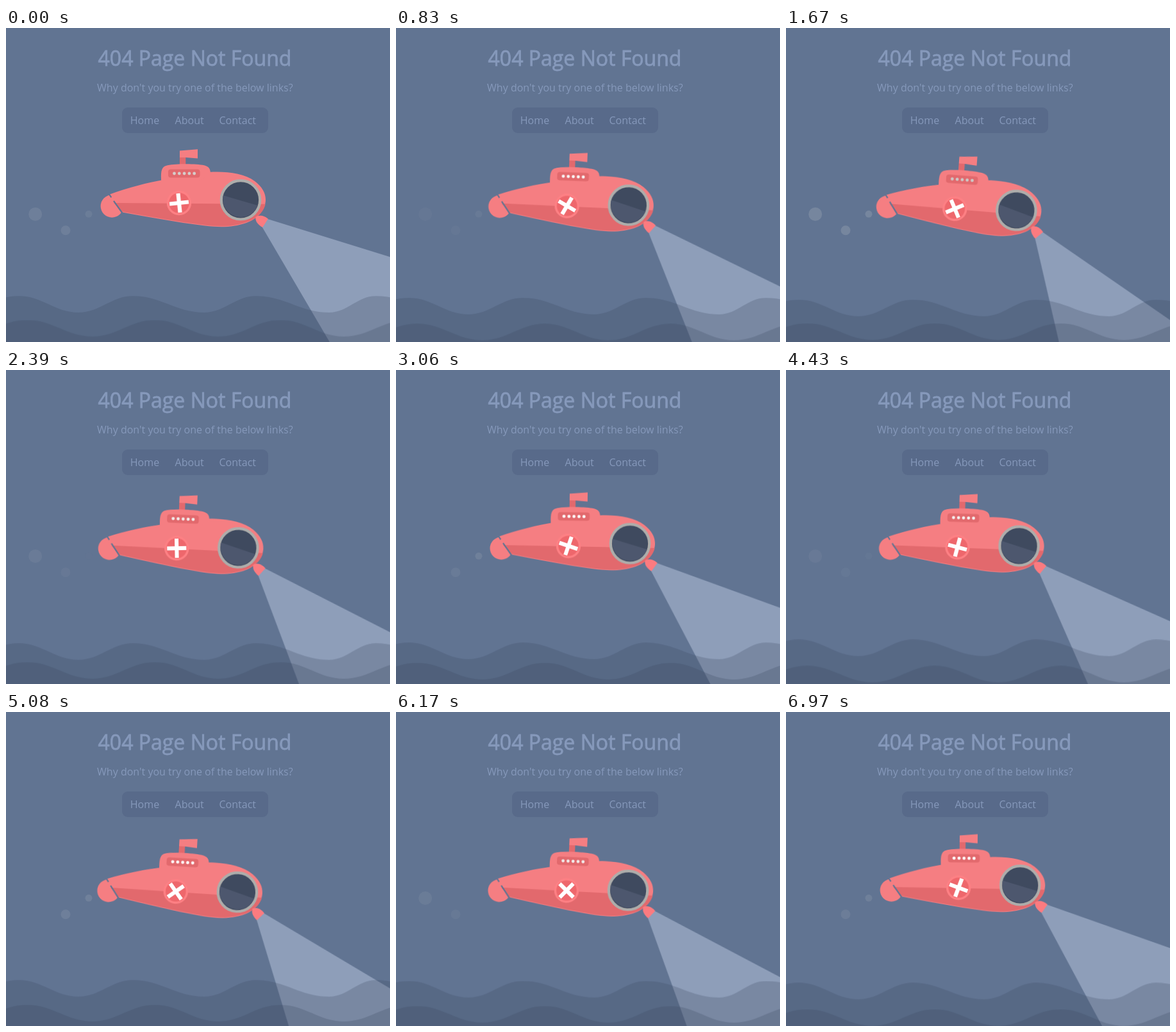
Animation of 599 by 490 pixels, one loop 7030 ms. Source, as an HTML page:

```html
<!DOCTYPE html>
<html lang="en">
<head>
<meta charset="utf-8">
<title>404 Page Not Found</title>
<style>
  html, body { margin: 0; width: 100%; height: 100%; overflow: hidden; background: #617492; }
  svg { display: block; width: 599px; height: 490px; }
  text { font: 16px "Open Sans", sans-serif; fill: #8699bb; }
  .title { font-size: 32px; stroke: #8699bb; stroke-width: .8px; }

  .light { fill: #f57e82; }
  .dark { fill: #e2696d; }
  .wave { fill: #3d4862; fill-opacity: .25; }
  .bubble { fill: #77879f; }

  .sub, .lamp, .wheel, .wave, .bubble, .dots { animation: 7.03s linear infinite; }
  .sub { transform-origin: 148px 189px; animation-name: pitch; }
  .lamp { transform-origin: 404.5px 304px; animation-name: sweep; }
  .wheel { transform-origin: 270px 273px; animation-name: spin; }
  .dots { animation-name: glow; }
  #back { animation-name: swell; }
  #front { animation-name: lap; }
  .big { animation-name: fade-big; }
  .mid { animation-name: fade-mid; }
  .small { animation-name: fade-small; }

  @keyframes pitch {
    0% { transform: rotate(0deg); }
    23.6% { transform: rotate(4.38deg); }
    50.6% { transform: rotate(-.62deg); }
    78% { transform: rotate(4.45deg); }
    100% { transform: rotate(.4deg); }
  }
  @keyframes sweep {
    0% { transform: rotate(0deg); }
    23.6% { transform: rotate(13.14deg); }
    50.6% { transform: rotate(-1.86deg); }
    78% { transform: rotate(13.35deg); }
    100% { transform: rotate(1.2deg); }
  }
  @keyframes spin {
    0% { transform: rotate(-6deg); }
    23.75% { transform: rotate(63deg); }
    43.5% { transform: rotate(108deg); }
    53.9% { transform: rotate(155deg); }
    72.3% { transform: rotate(232deg); }
    87.8% { transform: rotate(312deg); }
    100% { transform: rotate(385deg); }
  }
  @keyframes swell {
    0% { transform: translateY(1px); }
    36.6% { transform: translateY(10px); }
    77.2% { transform: translateY(0); }
    100% { transform: translateY(5.6px); }
  }
  @keyframes lap {
    0% { transform: translateY(1.5px); }
    17.2%, 57.9%, 98.6% { transform: translateY(10px); }
    37.6%, 78.2% { transform: translateY(0); }
    100% { transform: translateY(9.4px); }
  }
  @keyframes glow {
    0%, 27%, 54%, 81.4% { fill: #d6cdca; }
    6.4%, 33.4%, 60.4%, 87.8% { fill: #f1eae9; }
    16.4%, 23.5%, 43.5%, 50.5%, 70.5%, 77.9%, 98% { fill: #fff; }
    23.6%, 50.6%, 78% { fill: #cdc8c6; }
    100% { fill: #fff; }
  }
  @keyframes fade-big {
    0%, 27%, 54%, 81.4% { opacity: .6; }
    6.4%, 33.4%, 60.4%, 87.8% { opacity: .45; }
    16.4%, 23.5%, 43.5%, 50.5%, 70.5%, 77.9%, 98%, 100% { opacity: 0; }
    23.6%, 50.6%, 78% { opacity: 1; }
  }
  @keyframes fade-mid {
    0%, 27%, 54%, 81.4% { opacity: .6; }
    6.4%, 33.4%, 60.4%, 87.8% { opacity: .3; }
    11%, 38%, 65%, 92.4% { opacity: .15; }
    16.4%, 43.5%, 70.5%, 98% { opacity: .38; }
    18.2%, 45.3%, 72.3%, 100% { opacity: .6; }
    23.6%, 50.6%, 78% { opacity: 1; }
  }
  @keyframes fade-small {
    0%, 27%, 54%, 81.4% { opacity: .5; }
    6.4%, 33.4%, 60.4%, 87.8% { opacity: 0; }
    16.4%, 43.5%, 70.5%, 98%, 100% { opacity: .65; }
    23.6%, 50.6%, 78% { opacity: 1; }
  }
</style>
</head>
<body>
<svg viewBox="0 0 599 490">
  <rect width="599" height="490" fill="#617492"/>

  <text class="title" x="294.5" y="59" text-anchor="middle">404 Page Not Found</text>
  <text x="294.8" y="99" text-anchor="middle">Why don't you try one of the below links?</text>
  <rect x="181" y="124" width="228" height="40" rx="9" fill="#586a8a"/>
  <text x="193.8" y="150">Home</text>
  <text x="263.6" y="150">About</text>
  <text x="332.5" y="150">Contact</text>

  <circle class="bubble big" cx="45.7" cy="290.5" r="10.5"/>
  <circle class="bubble mid" cx="93" cy="315.8" r="7.5"/>
  <circle class="bubble small" cx="129" cy="290.3" r="5.5"/>

  <g class="sub">
    <!-- tail and hull -->
    <circle class="light" cx="165.3" cy="278" r="17.7"/>
    <path class="light" d="M162 259.5C190 249 220 241.5 250 236L319 224.7C345 223.5 372 227 388 239C400 248 405 258 405 268C405 281 395 297 375 304C355 311 335 311.5 310 308.5C265 303 220 294.5 181 287.5Z"/>
    <path class="dark" d="M168 273L404.6 274.7C403 284 394 297 375 303C355 310 335 310.5 310 307.5C265 302 220 293.5 181 286.5Z"/>
    <path d="M160 258L164.3 264.3M168 269.8L182 289.5" stroke="#617492" stroke-width="2.2"/>

    <!-- tower and periscope -->
    <path class="dark" d="M271 200H280.3V215H271Z"/>
    <path class="light" d="M271 191.6L299 189.3V203.6L280 202H271Z"/>
    <path class="light" d="M242.3 240C241 223 242.500 216 252 214.200C268 211.500 297 211.800 309 214.300C316 216 319 219.500 319 228L300 240Z"/>
    <rect class="dark" x="253" y="220.500" width="49.500" height="13" rx="4"/>
    <g class="dots">
      <circle cx="262.500" cy="227" r="2.400"/>
      <circle cx="270.300" cy="227" r="2.400"/>
      <circle cx="278.100" cy="227" r="2.400"/>
      <circle cx="285.900" cy="227" r="2.400"/>
      <circle cx="293.700" cy="227" r="2.400"/>
    </g>

    <!-- hatch -->
    <circle cx="270" cy="273" r="17.500" fill="#ee676c" stroke="#fd8084" stroke-width="3.400"/>
    <path class="wheel" d="M255 273H285M270 258V288" stroke="#fff" stroke-width="6.200"/>

    <!-- window -->
    <circle cx="366" cy="268.300" r="30.200" fill="#3f4a5f" stroke="#adadab" stroke-width="4.200"/>
    <path d="M338.900 261.200L392.700 276.900A28.100 28.100 0 0 1 338.900 261.200Z" fill="#4d576e"/>

    <g class="lamp">
      <path d="M408 297.900L1057 499.500L743 896L399 309.500Z" fill="#8e9eb9"/>
      <path d="M408.800 297.700L400.300 311C392.500 307 388.500 300.500 389.500 295.300C394 291.300 402 292.300 408.800 297.700Z" fill="#fb7b80"/>
    </g>
  </g>

  <path class="wave" id="back"/>
  <path class="wave" id="front"/>
</svg>
<script>
  // Smooth curve through alternating crests and troughs, closed below the stage.
  function wave(id, xs, crest, trough) {
    let d = '';
    xs.forEach((x, i) => {
      const y = i % 2 ? crest : trough, prev = i % 2 ? trough : crest;
      if (!i) { d = `M${x} ${y}`; return; }
      const bend = (x - xs[i - 1]) * .4;
      d += `C${xs[i - 1] + bend} ${prev} ${x - bend} ${y} ${x} ${y}`;
    });
    document.getElementById(id).setAttribute('d', d + 'V520H-100Z');
  }
  wave('back', [-80, 20, 113, 198, 309, 390, 504, 577, 690], 417.3, 443);
  wave('front', [-70, 33, 135, 232, 331, 428, 527, 627], 454.300, 480);
</script>
</body>
</html>
```
